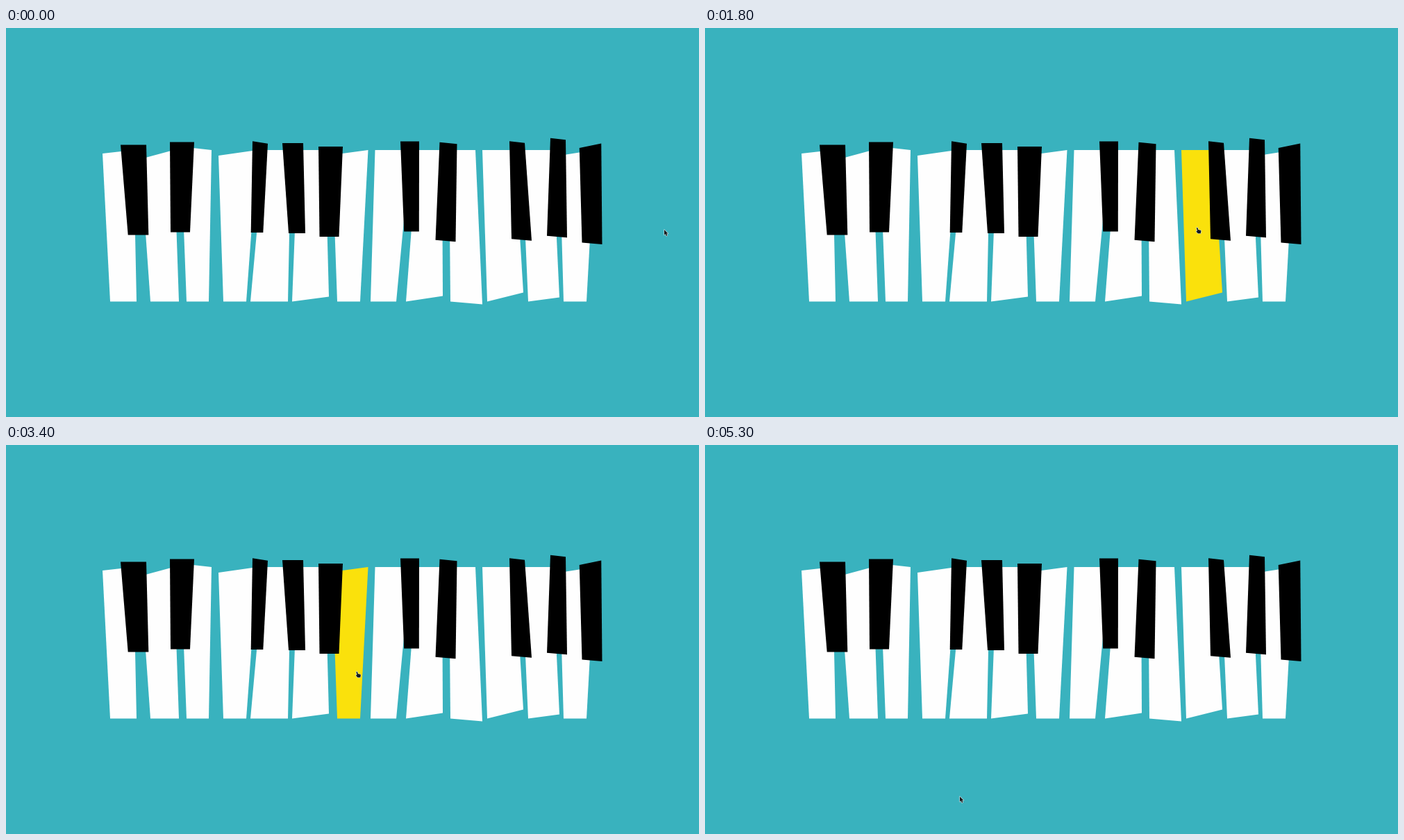
Animation, 998 px wide and 561 px high, one loop 6.3 s. Source, as an HTML page with a canvas:

```html
<!DOCTYPE html>
<html lang="en">
<head>
<meta charset="utf-8">
<title>Paper piano</title>
<style>
  html, body { margin: 0; width: 100%; height: 100%; overflow: hidden; background: #39b2be; }
  canvas { display: block; }
</style>
</head>
<body>
<canvas width="998" height="561"></canvas>
<script>
const LOOP = 6300;
const STEP = 100;
const HOVER_LAG = 22;
const TOP = 176;
const BOTTOM = 394.5;
const TOP_GAP = 10;
const ctx = document.querySelector('canvas').getContext('2d');

// The white keys are one strip of paper divided by slanted cuts.
// Each cut: centre at the top, centre at the bottom, gap at the bottom;
// then how far the key to its right drops at its top left and rises at its bottom right.
const cuts = [
  [134, 145, 10, 5], [188.5, 198, 20, 13], [246.5, 254.5, 11, -5],
  [301, 302.5, 21, 8], [367, 349, 6], [415.5, 409, 6, 0, 7],
  [464.5, 471, 12, 7], [526.5, 517.5, 15], [587.5, 569, 14, 0, 8],
  [633, 634.5, 11, 0, -4], [681, 689.5, 7, 0, 13], [737.5, 748.5, 7, 0, 6],
  [792, 800, 6, 8], [853, 841, 10]
];

// Top centre, bottom centre, top width, height on the stage, optional slope of the top edge.
const blackKeys = [
  [183.5, 190.5, 37, 168.5], [253.5, 251, 35, 164.5], [366, 361.5, 22, 165, 3.5],
  [413, 419, 30, 166], [467.5, 465.5, 35, 171], [581.5, 584, 27, 163.5],
  [637, 633, 25, 166], [736, 742.5, 22, 164.5], [795, 793.5, 22, 160],
  [841.5, 844, 31.5, 169.7, -6.5]
];

function quad(...corners) {
  return new Path2D(`M${corners.join('L')}Z`);
}

function whiteKey([topX, bottomX, gap, drop = 0, rise = 0], i) {
  const [nextTopX, nextBottomX, nextGap] = cuts[i + 1];
  const shape = quad(
    [topX + TOP_GAP / 2, TOP + drop], [nextTopX - TOP_GAP / 2, TOP],
    [nextBottomX - nextGap / 2, BOTTOM - rise], [bottomX + gap / 2, BOTTOM]
  );
  return { shape, fill: '#fefefe', lit: '#fae10c' };
}

// Keys on the left narrow downwards; those on the right are longer and lean.
function blackKey([topX, bottomX, width, y, slope], i) {
  const isLeft = i < 6;
  const half = width / 2;
  const bottomHalf = isLeft ? half * 0.8 : 14.5;
  const bottomY = y + (isLeft ? 130 : 141);
  const lean = isLeft ? 0 : 1.2;
  const topLean = slope === undefined ? lean : slope / 2;
  const shape = quad(
    [topX - half, y - topLean], [topX + half, y + topLean],
    [bottomX + bottomHalf, bottomY + lean], [bottomX - bottomHalf, bottomY - lean]
  );
  return { shape, fill: '#000', lit: '#e8007d' };
}

const keys = [...cuts.slice(0, -1).map(whiteKey), ...blackKeys.map(blackKey)];

const arrow = new Path2D('M0 0V7.4L1.7 5.9L3 8.9L4.4 8.3L3.1 5.4H5.5Z');
const hand = new Path2D('M-.6 .3Q.5 -.6 1.1 .6L1.8 3L5.2 3.8Q6 4.2 5.8 5.6L5.2 8.2H1.4L-1 5.4Q-1.2 4.4 .5 4.8Z');

// Pointer stops: time, x, y.
const route = [
  [850, 948, 291], [1500, 775, 277], [2100, 642, 299], [2900, 574, 319],
  [3400, 505, 327], [3600, 490, 355], [4300, 367, 507]
];

function pointerAt(time) {
  const next = route.findIndex(stop => stop[0] > time);
  if (next === 0) return route[0].slice(1);
  if (next < 0) return route.at(-1).slice(1);
  const [t0, x0, y0] = route[next - 1];
  const [t1, x1, y1] = route[next];
  const k = (time - t0) / (t1 - t0);
  return [x0 + (x1 - x0) * k, y0 + (y1 - y0) * k];
}

function drawPointer(x, y, shape) {
  ctx.save();
  ctx.translate(x, y);
  ctx.lineWidth = 1.2;
  ctx.lineJoin = 'round';
  ctx.strokeStyle = '#d5e4e6';
  ctx.stroke(shape);
  ctx.fillStyle = '#15191b';
  ctx.fill(shape);
  ctx.restore();
}

function draw(now) {
  const time = Math.floor((now % LOOP) / STEP) * STEP;
  const hoverPoint = pointerAt(time - HOVER_LAG);
  const hovered = keys.findLast(key => ctx.isPointInPath(key.shape, ...hoverPoint));

  ctx.fillStyle = '#39b2be';
  ctx.fillRect(0, 0, 998, 561);
  for (const key of keys) {
    ctx.fillStyle = key === hovered ? key.lit : key.fill;
    ctx.fill(key.shape);
  }
  drawPointer(...pointerAt(time), hovered ? hand : arrow);
  requestAnimationFrame(draw);
}
requestAnimationFrame(draw);
</script>
</body>
</html>
```
